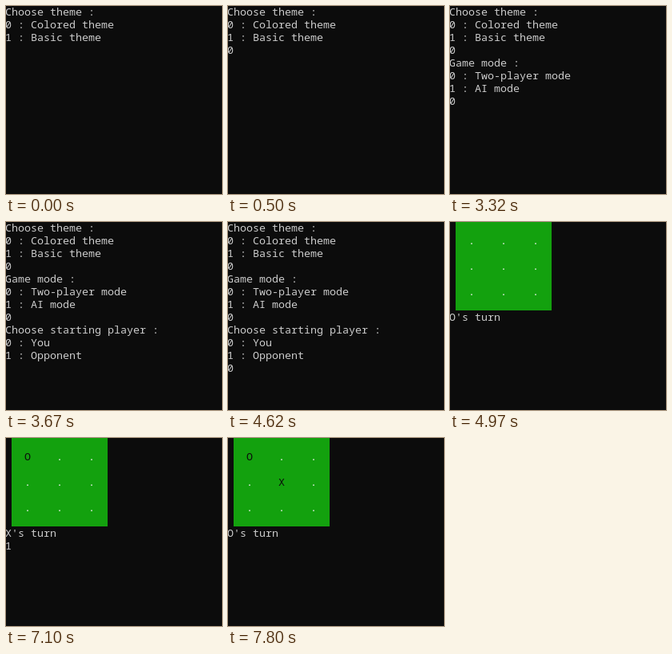
An HTML page with a canvas for the animation above (8000 ms loop, 270 px wide and 236 px high).

```html
<!DOCTYPE html>
<html lang="en">
<head>
<meta charset="utf-8">
<title>Console tic-tac-toe</title>
<style>
html, body { margin: 0; width: 100%; height: 100%; overflow: hidden; background: #0c0c0c; }
canvas { display: block; width: 270px; height: 236px; }
</style>
</head>
<body>
<canvas id="stage" width="270" height="236"></canvas>
<script>
const ctx = document.getElementById("stage").getContext("2d", { alpha: false });
const LOOP = 8000, COL = 8, ROW = 16, LEFT = -1, TOP = -1;
const BLACK = "#0c0c0c", GREY = "#cccccc", WHITE = "#f2f2f2", GREEN = "#13a10e";
const BOARD_AT = 4970;

// Console lines of the menu: time of appearance, first row, text
const menu = [
  [0, 0, ["Choose theme :", "0 : Colored theme", "1 : Basic theme"]],
  [500, 3, ["0"]],
  [930, 4, ["Game mode :", "0 : Two-player mode", "1 : AI mode"]],
  [3320, 7, ["0"]],
  [3670, 8, ["Choose starting player :", "0 : You", "1 : Opponent"]],
  [4620, 11, ["0"]]
];

// Each move: key times, time it lands on the board, cell and mark
const moves = [
  { keys: [5280, 5530], done: 5880, cell: [0, 0], mark: "O" },
  { keys: [7100, 7410], done: 7800, cell: [1, 1], mark: "X" }
];

function print(text, col, row, color = GREY) {
  ctx.fillStyle = color;
  ctx.fillText(text, LEFT + col * COL, TOP + row * ROW + 13);
}

function drawMenu(t) {
  for (const [at, row, lines] of menu) {
    if (t >= at) lines.forEach((line, i) => print(line, 0, row + i));
  }
}

function drawBoard(t) {
  ctx.fillStyle = GREEN;
  ctx.fillRect(LEFT + COL, TOP, 15 * COL, 7 * ROW);
  const played = moves.filter(m => t >= m.done);
  for (let y = 0; y < 3; y++) {
    for (let x = 0; x < 3; x++) {
      const move = played.find(m => m.cell[0] === x && m.cell[1] === y);
      print(move ? move.mark : ".", 3 + 5 * x, 1 + 2 * y, move ? BLACK : WHITE);
    }
  }
  print((played.length % 2 ? "X" : "O") + "'s turn", 0, 7);
  const next = moves[played.length];
  if (next) next.keys.forEach((at, i) => {
    if (t >= at) print(String(next.cell[i]), 2 * i, 8);
  });
}

function draw(now) {
  const t = now % LOOP;
  ctx.fillStyle = BLACK;
  ctx.fillRect(0, 0, 270, 236);
  ctx.font = "13.333px 'Noto Sans Mono', 'DejaVu Sans Mono', monospace";
  if (t < BOARD_AT) drawMenu(t);
  else drawBoard(t);
}

const start = performance.now();
function frame() {
  draw(performance.now() - start);
  requestAnimationFrame(frame);
}
frame();
</script>
</body>
</html>
```
